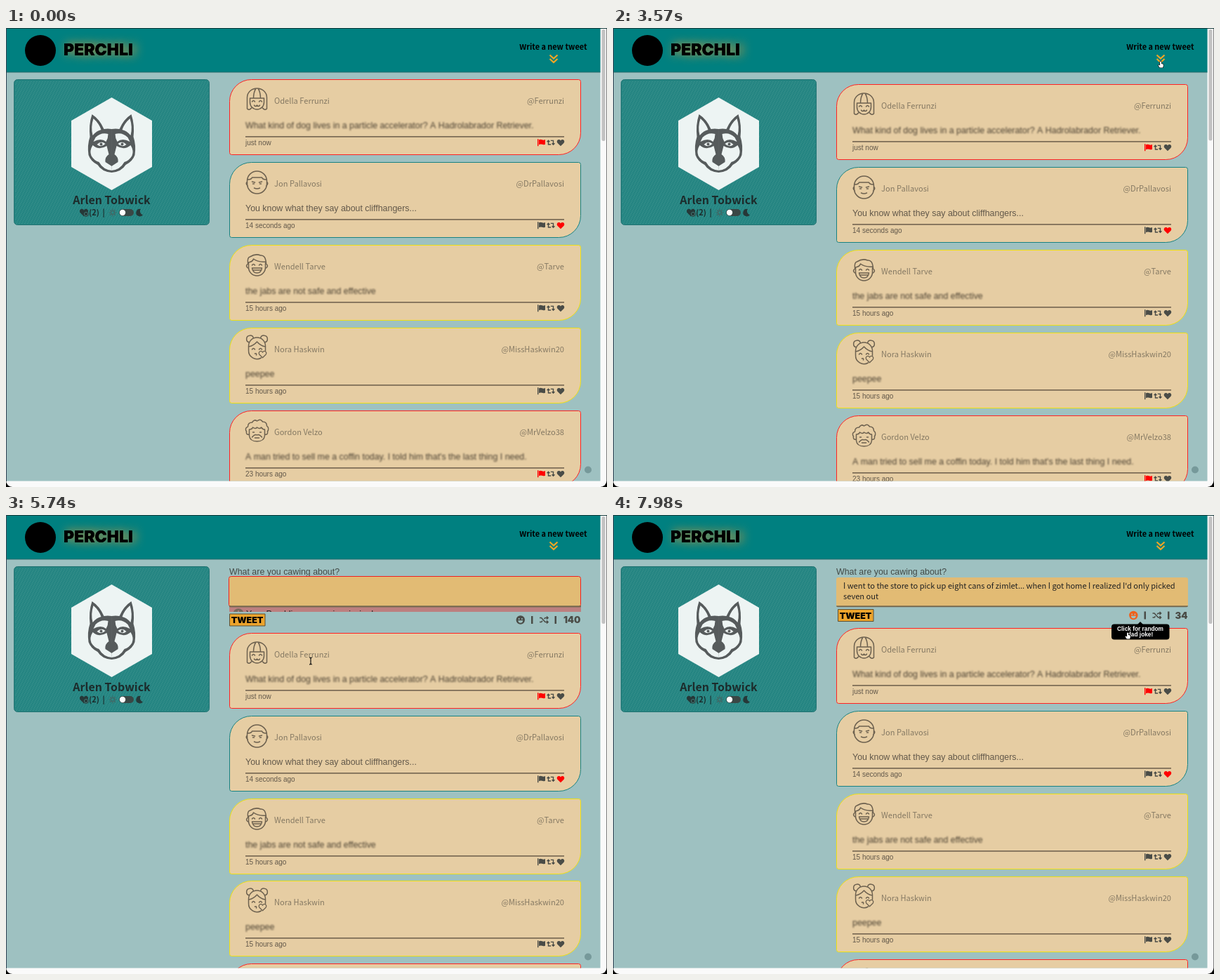
These frames come from a looping animation (856x654 px, 8 s). An HTML page with a canvas:

```html
<!DOCTYPE html>
<html lang="en">
<head>
<meta charset="utf-8">
<title>Perchli</title>
<style>
html, body { margin: 0; width: 100%; height: 100%; overflow: hidden; background: #000; }
canvas { display: block; }
</style>
</head>
<body>
<canvas id="stage" width="856" height="654"></canvas>
<script>
const ctx = document.getElementById('stage').getContext('2d');
const LOOP = 8000;
const SANS = '"Liberation Sans", Arial, sans-serif';
const HUMAN = '"Noto Sans CJK JP", "Noto Sans CJK SC", "Noto Sans CJK", "Noto Sans", sans-serif';
const HEAVY = 'Inter, Roboto, sans-serif';
const BG = '#9ec1c1', DARK = '#4a4c47', CARD = '#e6cda3';

const TWEETS = [
  { name: 'Odella Ferrunzi', at: '@Ferrunzi', when: 'just now', edge: '#f22', flag: true,
    text: 'What kind of dog lives in a particle accelerator? A Hadrolabrador Retriever.' },
  { name: 'Jon Pallavosi', at: '@DrPallavosi', when: '14 seconds ago', edge: '#178282', liked: true, clear: true,
    text: 'You know what they say about cliffhangers...' },
  { name: 'Wendell Tarve', at: '@Tarve', when: '15 hours ago', edge: '#eee010',
    text: 'the jabs are not safe and effective' },
  { name: 'Nora Haskwin', at: '@MissHaskwin20', when: '15 hours ago', edge: '#eee010', text: 'peepee' },
  { name: 'Gordon Velzo', at: '@MrVelzo38', when: '23 hours ago', edge: '#f22', flag: true,
    text: "A man tried to sell me a coffin today. I told him that's the last thing I need." }
];

// Line-art portraits, centred on 0,0
const FACES = [
  'M-14 13V-3A14 13 0 0 1 14-3V13Q11 16 8 12M-14 13Q-11 16-8 12M-10-2H10M-10-2V4A10 10 0 0 0 10 4V-2' +
    'M-5-2Q-5-10-2-15M5-2Q5-10 2-15M-7 3q2-3 4 0M3 3q2-3 4 0M-4 8q2 3 4 0q2 3 4 0',
  'M-14-2A14 14 0 0 1 14-2V2A14 14 0 0 1-14 2ZM-13-4Q-8-4-7-7H7Q8-4 13-4M-14-1q-3 3 1 6M14-1q3 3-1 6' +
    'M-7-1l4 1M7-1l-4 1M-6 2h2M4 2h2M-4 8Q0 10 4 8',
  'M-12-3V3A12 12 0 0 0 12 3V-3M-13-3Q-14-11-10-12Q-2-17 5-14Q12-15 13-3M-12-4Q-6-5-5-9Q2-4 12-5M-13-2q-4 3 0 6' +
    'M13-2q4 3 0 6M-7 0q2-3 4 0M3 0q2-3 4 0M-7 4H7Q6 11 0 11Q-6 11-7 4ZM-6 7H6',
  'M6 14A12 12 0 0 1-12 3V-3A12 12 0 0 1 12-3V4M-11-8A5 5 0 1 1-5-14M11-8A5 5 0 1 0 5-14M-12-2Q-5-3 0-9Q5-3 12-2' +
    'M-7 2q2-3 4 0M3 2q2-3 4 0M-3 8q3-1 2 2',
  'M-11-2V7Q-10 15 0 15Q10 15 11 7V-2M-11 5q-5 1-4-4q-3-5 2-7q0-6 6-6q3-5 7-2q5-4 8 1q6 0 6 6q4 3 1 8q1 5-4 4' +
    'M-11-2q4 0 5-3q4 3 6 0q4 3 6 0q2 3 5 3M-6 2h2M4 2h2M-7 9Q-3 4 0 6Q3 4 7 9M-3 10h6'
].map(d => new Path2D(d));

const HEART = new Path2D('M0 4.8L-4.6.2C-7-3.4-2.3-6.4 0-2.9C2.3-6.4 7-3.4 4.6.2Z');
const FLAG = new Path2D('M-5.5-5h1.4V5h-1.4ZM-3.5-4Q-1-5 1-4T5.5-4.2V2.5Q3 3.5 1 2.6T-3.5 3Z');
const CYCLE = new Path2D('M-5.4-1L-3.5-3L-1.6-1M-3.5-2.5V2.8H.2M5.4 1L3.5 3L1.6 1M3.5 2.5V-2.8H-.2');
const SHUFFLE = new Path2D('M-6-3H-3.5L2 3H5.5M-6 3H-3.5L-2 1.3M.6-1.5L2-3H5.5M4-5L6-3L4-1M4 1L6 3L4 5');
const ARROW = new Path2D('M0 0V8L2 6.4L3.2 9.2L4.5 8.6L3.4 5.9H5.8Z');
const HAND = new Path2D('M-.9 0Q0-1 .9 0V2.8L3.8 3.7V6.3L3 8.5H-1.3L-3.4 5.3Q-3.2 4-1.7 5L-.9 5.6Z');
const BEAM = new Path2D('M-2-5Q0-5 0-3.6Q0-5 2-5M0-4V4M-2 5Q0 5 0 3.6Q0 5 2 5');

// time, x, y, shape
const POINTER = [
  [1400, 820, 118, 'a'], [1820, 780, 44, 'h'], [2100, 780, 43, 'h'], [2450, 780, 48, 'h'],
  [3850, 780, 48, 'h'], [4130, 732, 63, 'a'], [4970, 414, 147, 'a'], [5040, 414, 147, 'a'],
  [5250, 350, 144, 'h'], [5460, 350, 144, 'a'], [5740, 434, 208, 'i'], [5950, 470, 212, 'i'],
  [6650, 775, 172, 'i'], [6800, 775, 171, 'i'], [7000, 733, 168, 'h'], [8000, 733, 168, 'h']
];

const swing = p => 0.5 - Math.cos(Math.PI * Math.min(1, Math.max(0, p))) / 2;

function text(s, x, y, font, color, align = 'left') {
  ctx.font = font;
  ctx.fillStyle = color;
  ctx.textAlign = align;
  ctx.fillText(s, x, y);
}

function rect(x, y, w, h, color, r = 0, edge) {
  ctx.beginPath();
  ctx.roundRect(x, y, w, h, r);
  ctx.fillStyle = color;
  ctx.fill();
  if (edge) outline(edge, 1);
}

function outline(color, width, path) {
  ctx.strokeStyle = color;
  ctx.lineWidth = width;
  path ? ctx.stroke(path) : ctx.stroke();
}

function disc(x, y, r, color) {
  ctx.beginPath();
  ctx.arc(x, y, r, 0, 7);
  ctx.fillStyle = color;
  ctx.fill();
}

function at(x, y, draw) {
  ctx.save();
  ctx.translate(x, y);
  draw();
  ctx.restore();
}

function icon(path, x, y, color, line) {
  at(x, y, () => {
    ctx.fillStyle = color;
    line ? outline(color, line, path) : ctx.fill(path);
  });
}

function poly(points, color) {
  ctx.beginPath();
  points.forEach(p => ctx.lineTo(p[0], p[1]));
  ctx.fillStyle = color;
  ctx.fill();
}

function header() {
  rect(0, 0, 847, 63, '#008080');
  rect(0, 62.5, 847, 1, '#2c6c6c');
  disc(49, 32, 22, '#000');
  ctx.save();
  ctx.shadowColor = '#d99a3c';
  ctx.shadowBlur = 14;
  ctx.shadowOffsetX = 4;
  text('PERCHLI', 82, 38.8, '900 23px ' + HEAVY, '#000');
  ctx.restore();
  text('PERCHLI', 82, 38.8, '900 23px ' + HEAVY, '#000');
  text('Write a new tweet', 827.5, 31, 'bold 10.9px ' + HUMAN, '#000', 'right');
  ctx.beginPath();
  for (const y of [38.5, 44]) {
    ctx.moveTo(774.5, y);
    ctx.lineTo(780, y + 5);
    ctx.lineTo(785.5, y);
  }
  outline('#f5a623', 2.1);
}

function husky() {
  const ink = '#565b5c', pale = '#edf4f3';
  const shape = (d, color) => {
    ctx.fillStyle = color;
    ctx.fill(new Path2D(d));
  };
  poly([[0, -66], [57.5, -33], [57.5, 33], [0, 66], [-57.5, 33], [-57.5, -33]], pale);
  for (const side of [-1, 1]) {
    ctx.save();
    ctx.scale(side, 1);
    shape('M-.3-21Q6-22 11-21Q17-35 28-42Q33-27 31-10Q35 2 33 16Q30 25 20 30Q14 40-.3 41Z', ink);
    shape('M26-36Q30-24 27-12Q21-19 15-20Q18-29 26-36Z', pale);
    shape('M5-14Q15-17 23-9L26-3Q15-9 8-3Q5-8 5-14Z', pale);
    shape('M7 3Q18 10 27 2Q32 10 29 17Q25 24 18 26Q12 37-.3 38V32L9 26Q10 19 4 15Z', pale);
    shape('M9 0Q15-5 21 1Q15 6 9 0Z', pale);
    shape('M-.3 18Q9 18 7 24L2 30H-.3Z', ink);
    ctx.restore();
    disc(side * 15, 0.5, 2, ink);
  }
}

function sidebar() {
  rect(11.5, 73.5, 278, 207, '#258582', 5, '#247473');
  ctx.fillStyle = 'rgba(110,175,170,.28)';
  for (let y = 76; y < 279; y += 2)
    for (let x = 13 + y * 1.5 % 4; x < 288; x += 4) ctx.fillRect(x, y, 1.6, 1);
  at(150.5, 165, husky);
  text('Arlen Tobwick', 150.5, 251, 'bold 15.9px ' + HUMAN, '#1c2b2b', 'center');
  at(111, 263, () => { ctx.scale(1.15, 1.15); icon(HEART, 0, 0, '#263838'); });
  disc(114, 265, 3.8, '#263838');
  ctx.beginPath();
  ctx.arc(114, 265, 2.6, 0, 7);
  outline('#4a8885', 0.8);
  text('(2)', 118, 267, 'bold 11px ' + HUMAN, '#1c2b2b');
  text('|', 137.5, 267, 'bold 11px ' + HUMAN, '#1c2b2b');
  ctx.beginPath();
  for (let i = 0; i < 8; i++) {
    const a = i * Math.PI / 4;
    ctx.moveTo(152 + 3.5 * Math.cos(a), 263 + 3.5 * Math.sin(a));
    ctx.lineTo(152 + 5.5 * Math.cos(a), 263 + 5.5 * Math.sin(a));
  }
  ctx.moveTo(154.5, 263);
  ctx.arc(152, 263, 2.5, 0, 7);
  outline('#456260', 1.2);
  rect(161, 258, 21, 10, '#3a4745', 5);
  disc(166, 263, 4.2, '#fff');
  icon(new Path2D('M2-5A5.3 5.3 0 1 0 5 3A5 5 0 0 1 2-5Z'), 190, 263, '#263838');
}

function card(tw, i, y) {
  rect(318.5, y, 500, 107, CARD, [31, 3, 31, 3], tw.edge);
  at(357.5, y + 28.5, () => {
    ctx.lineJoin = ctx.lineCap = 'round';
    outline('#6d614f', 1.5, FACES[i]);
    if (i === 3) at(8, 9, () => { ctx.fillStyle = CARD; ctx.fill(HEART); outline('#6d614f', 1.3, HEART); });
  });
  text(tw.name, 382, y + 34, '300 11.1px ' + HUMAN, '#857963');
  text(tw.at, 795, y + 34, '300 11.1px ' + HUMAN, '#857963', 'right');
  ctx.save();
  if (!tw.clear) ctx.filter = 'blur(1.3px)';
  text(tw.text, 341, y + 69.7, '12.4px ' + SANS, tw.clear ? '#62584a' : '#4c4233');
  ctx.restore();
  rect(341, y + 80.5, 454, 1.7, '#7c6c56');
  text(tw.when, 341, y + 93.7, '10px ' + SANS, '#62584a');
  icon(FLAG, 762.5, y + 89.7, tw.flag ? '#f00' : DARK);
  icon(CYCLE, 776, y + 89.7, DARK, 1.4);
  icon(HEART, 790, y + 90, tw.liked ? '#f00' : DARK);
}

function smiley(x, y, color) {
  disc(x, y, 6.2, color);
  disc(x - 2.1, y - 1.5, 1, BG);
  disc(x + 2.1, y - 1.5, 1, BG);
  ctx.beginPath();
  ctx.arc(x, y + 0.8, 3.4, 0, Math.PI);
  ctx.fillStyle = BG;
  ctx.fill();
}

function form(t, open, err) {
  const bad = t >= 5534 && t < 7500, joke = t >= 7630;
  const hover = t >= 6960, dx = joke ? 8.5 : 0;
  ctx.save();
  ctx.beginPath();
  ctx.rect(310, 73.5, 520, 140);
  ctx.clip();
  ctx.translate(0, -103 * (1 - open));
  text('What are you cawing about?', 318, 84.5, '12.4px ' + SANS, '#434a47');
  if (err > 0) {
    ctx.save();
    ctx.beginPath();
    ctx.rect(318, 131, 501, err + 0.6);
    ctx.clip();
    rect(318, 131, 501, 25, '#bc7f7f', [0, 0, 3, 3]);
    ctx.translate(0, -4 * (1 - err / 24.4));
    disc(331, 144, 7.7, '#79695c');
    text('!', 331, 148.2, 'bold 12px ' + SANS, '#bc7f7f', 'center');
    text('Your Perchli message is missing!', 342, 148.3, '12.4px ' + SANS, '#252222');
    ctx.restore();
  }
  rect(318, 89, 501, 42, '#e2bb74', 3);
  rect(318, 129.2, 501, 2, '#75684f', [0, 0, 3, 3]);
  if (bad) {
    rect(317.5, 87.5, 501, 43, '#e2bb74', 3, '#f02020');
    rect(318, 129.2, 501, 2, '#75684f');
  }
  if (t < 5300 && Math.floor((t - 3500) / 530) % 2 === 0) rect(328, 95, 1, 13.5, '#333');
  if (joke) {
    text("I went to the store to pick up eight cans of zimlet... when I got home I realized I'd only picked",
      328, 105.2, '11.1px ' + HUMAN, '#222');
    text('seven out', 328, 119.5, '11.1px ' + HUMAN, '#222');
  }
  ctx.translate(0, err);
  const bx = joke ? 2 : 0;
  rect(318.5 + bx, 134.5, 50.5, 17, '#eca42c', 0, '#5b5138');
  text('TWEET', 343.5 + bx, 147.7, '900 12.4px ' + HEAVY, '#000', 'center');
  smiley(732.8 + dx, 143, hover ? '#f0601c' : DARK);
  rect(748 + dx, 137.5, 2.5, 11, DARK);
  icon(SHUFFLE, 766 + dx, 143, DARK, 1.6);
  rect(781.5 + dx, 137.5, 2.5, 11, DARK);
  text(joke ? '34' : '140', 818.5, 147.5, '900 13.2px ' + HEAVY, DARK, 'right');
  ctx.restore();
}

function tooltip(t, err) {
  if (t < 6990) return;
  at(t >= 7630 ? 751 : 742.5, err, () => {
    rect(-41, 155.5, 82.5, 22, '#000', 4);
    poly([[-4, 156], [0, 152], [4, 156]], '#000');
    text('Click for random', 0, 165, 'bold 8.3px ' + SANS, '#fff', 'center');
    text('dad joke!', 0, 173, 'bold 8.3px ' + SANS, '#fff', 'center');
  });
}

function pointer(t) {
  const k = POINTER.findIndex((p, i) => i && t < p[0]);
  if (t < POINTER[0][0] || k < 1) return;
  const a = POINTER[k - 1], b = POINTER[k];
  const e = swing((t - a[0]) / (b[0] - a[0]));
  const [path, fill, edge] = {
    a: [ARROW, '#000', '#fff'], h: [HAND, '#fff', '#000'], i: [BEAM, '#0000', '#111']
  }[a[3]];
  at(a[1] + (b[1] - a[1]) * e, a[2] + (b[2] - a[2]) * e, () => {
    outline(edge, 1.2, path);
    ctx.fillStyle = fill;
    ctx.fill(path);
  });
}

function frame() {
  const t = performance.now() % LOOP;
  const open = swing((t - 3460) / 600);
  const err = 24.4 * (swing((t - 5534) / 600) - swing((t - 7500) / 440));

  rect(0, 0, 856, 654, '#000');
  rect(0, 0, 855.5, 654, '#fafafa', [0, 0, 9, 9]);
  ctx.save();
  ctx.beginPath();
  ctx.rect(0, 0, 846.5, 645.5);
  ctx.clip();
  rect(0, 0, 847, 646, BG);
  header();
  sidebar();
  if (open > 0) form(t, open, err);
  TWEETS.forEach((tw, i) => card(tw, i, Math.floor(73.6 + 88.2 * open + err + 117.9 * i) + 0.5));
  tooltip(t, err);
  disc(829, 629.5, 5, '#76999a');
  ctx.restore();
  rect(848.5, 2, 5, 159 - 6 * open, '#c2c2c2', 2.5);
  rect(0, 0, 856, 1, '#173c3c');
  rect(0, 0, 1, 646, '#345');
  pointer(t);
  requestAnimationFrame(frame);
}
frame();
</script>
</body>
</html>
```
